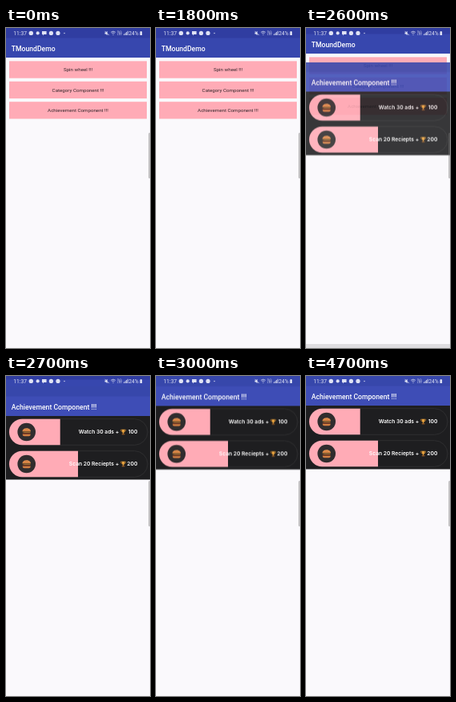
These frames come from a looping animation (180x400 px, 4800 ms). An HTML page:

```html
<!DOCTYPE html>
<html lang="en">
<head>
<meta charset="utf-8">
<title>Component demo</title>
<style>
html, body { margin: 0; width: 100%; height: 100%; overflow: hidden; background: #111; }
svg { display: block; width: 100vw; height: 100vh; font-family: Roboto, sans-serif; }
.title { font-size: 8.65px; font-weight: 500; fill: #fff; }
.label { font-size: 6.2px; fill: #33262b; text-anchor: middle; }
.goal { font: 600 6.7px Inter, sans-serif; fill: #fff; text-anchor: end; }
.status { font-size: 6.7px; fill: #dfe2f4; }
.tiny { font-size: 3px; }
</style>
</head>
<body>
<svg viewBox="0 0 180 400" preserveAspectRatio="none">
  <defs>
    <g id="burger">
      <path d="M-5.2 -.9C-5.2 -6.2 5.2 -6.2 5.2 -.9Z" fill="#d98545"/>
      <path d="M-2.6 -3.6h.8M.2 -4.2h.8M2.4 -3h.8" stroke="#f0bd80" stroke-width=".6"/>
      <path d="M-5.2 -.3h10.4" stroke="#8a5a2c" stroke-width="1.1"/>
      <path d="M-5 .5h10l-2.6 1.4z" fill="#eaa73f"/>
      <rect x="-5.2" y=".9" width="10.4" height="1.8" rx=".9" fill="#6b3220"/>
      <path d="M-5 2.8h10c0 1.9-1 2.4-2.2 2.4h-5.6c-1.2 0-2.2-.5-2.2-2.4z" fill="#d17d42"/>
    </g>
    <g id="cup" transform="scale(.9)">
      <path d="M-2 -3.1h-1.5c0 2 .7 2.7 2 2.8M2 -3.1h1.5c0 2-.7 2.7-2 2.8" fill="none" stroke="#c9852f" stroke-width=".7"/>
      <path d="M-2.2 -3.7h4.4c0 3-.6 4.3-1.7 4.7v1.2h-1v-1.2c-1.1-.4-1.7-1.7-1.7-4.7z" fill="#e39f3c"/>
      <rect x="-2" y="2.1" width="4" height="1.7" fill="#8a5526"/>
    </g>
  </defs>

  <g id="home"></g>
  <g id="goals"></g>

  <g id="system">
    <text class="status" x="9.3" y="8.9">11:37</text>
    <g fill="#dfe2f4">
      <circle cx="31.3" cy="6.4" r="2.7"/>
      <circle cx="39.7" cy="6.4" r="2.1"/>
      <path d="M45 4h5.6v4h-3.3l-1.3 1.4v-1.4h-1z"/>
      <circle cx="56.4" cy="6.4" r="2.6"/>
      <circle cx="65" cy="6.4" r="2.6"/>
      <circle cx="73" cy="6.5" r=".7"/>
      <path d="M123.5 5.4h1.3l1.8-1.6v5.4l-1.8-1.6h-1.3z"/>
      <path d="M147.2 9v-1.5h.9v1.5zM148.7 9v-2.7h.9v2.7zM150.2 9v-3.9h.9v3.9zM151.7 9v-5.2h.9v5.2z"/>
      <path d="M167.5 4.6h.7v-.7h1.2v.7h.7v4.4h-2.6z"/>
    </g>
    <path d="M123.6 3.9l5.2 5.2M131.2 5.3q2.8-2.4 5.600 0M132.400 6.700q1.600-1.300 3.200 0M134 8v1" fill="none" stroke="#dfe2f4" stroke-width=".8"/>
    <text class="status tiny" x="139" y="6.3">Vo))</text>
    <text class="status tiny" x="139" y="9.2">LTE1</text>
    <text class="status" x="153.2" y="8.9">24%</text>
    <path d="M180 131h-.8q-1.2 0-1.2 1.5v54q0 1.5 1.2 1.5h.8z" fill="#777" opacity=".4"/>
  </g>
</svg>
<script>
const LOOP = 4800;
const PINK = '#ffabb6';
const byId = id => document.getElementById(id);

const page = (title, bar, top) => `
  <rect width="180" height="400" fill="#faf9fc"/>
  <rect width="180" height="37" fill="${bar}"/>
  <rect width="180" height="12.5" fill="${top}"/>
  <text class="title" x="6.8" y="28.5">${title}</text>`;

const button = (label, i) => {
  const y = 41.4 + i * 25.4;
  return `<rect x="4" y="${y}" width="172" height="21.3" fill="${PINK}"/>
    <text class="label" x="90" y="${y + 12.9}">${label}</text>`;
};

const goal = (label, points, end, i) => `
  <g transform="translate(0 ${57 + i * 40})">
    <rect x="4" y="-16.3" width="173" height="32.6" rx="16.3" fill="none" stroke="#353537" stroke-width=".7"/>
    <path d="M${end} -16.2H20.2a16.2 16.2 0 0 0 0 32.4H${end}z" fill="${PINK}"/>
    <circle cx="25.7" r="11.3" fill="#302d2e"/>
    <use href="#burger" x="25.7"/>
    <text class="goal" x="141.2" y="2.4">${label} +</text>
    <use href="#cup" x="146.6"/>
    <text class="goal" x="164.3" y="2.4">${points}</text>
  </g>`;

byId('home').innerHTML = page('TMoundDemo', '#3747ae', '#303da1') +
  ['Spin wheel !!!', 'Category Component !!!', 'Achievement Component !!!'].map(button).join('');

byId('goals').innerHTML = page('Achievement Component !!!', '#3e4db6', '#3747ab') +
  '<rect y="37" width="180" height="79.5" fill="#1e1e20"/>' +
  goal('Watch 30 ads', 100, 67.7, 0) + goal('Scan 20 Reciepts', 200, 90, 1);

// Each row: start time in ms, vertical shift, opacity; held until the next row.
const moves = {
  home: [[0, 0, 1], [2600, -5, 1], [2700, -8, 1], [2800, -9, 1], [3100, 0, 1]],
  goals: [[0, 42, 0], [2600, 42.5, .89], [2700, 13, 1], [2800, 3.5, 1],
          [2900, 1.4, 1], [3000, .4, 1], [3100, 0, 1]]
};

for (const [id, rows] of Object.entries(moves)) {
  const frames = [...rows, [LOOP, ...rows.at(-1).slice(1)]].map(([t, y, opacity]) => ({
    offset: t / LOOP, transform: `translateY(${y}px)`, opacity, easing: 'steps(1, end)'
  }));
  byId(id).animate(frames, { duration: LOOP, iterations: Infinity });
}
</script>
</body>
</html>
```
